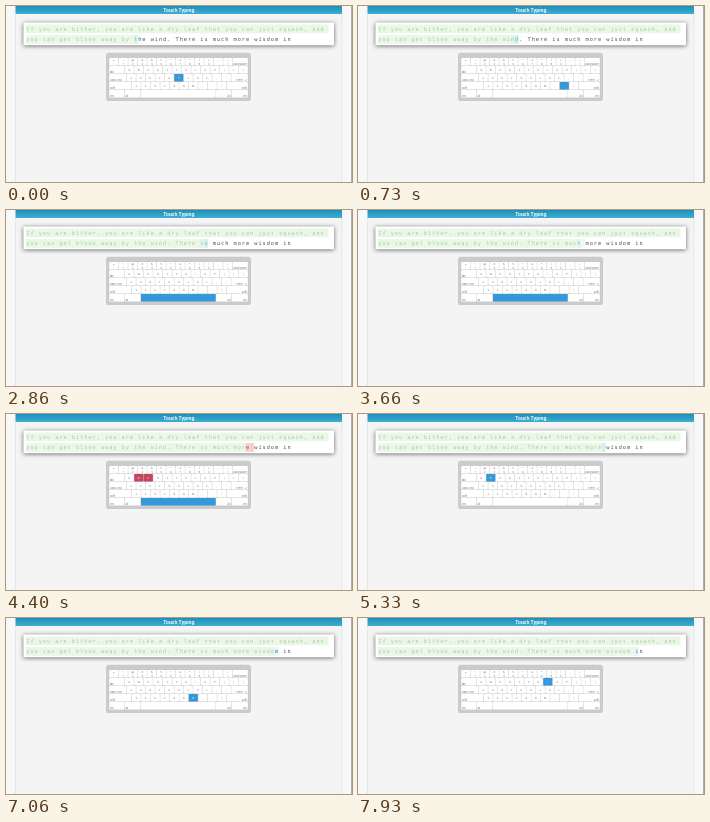
An HTML page with a canvas that plays this animation: 346 px wide and 176 px high, repeating every 8000 ms.

```html
<!DOCTYPE html>
<html lang="en">
<head>
<meta charset="utf-8">
<title>Touch Typing</title>
<style>
html, body { margin: 0; width: 100%; height: 100%; overflow: hidden; background: #f5f5f5; }
canvas { display: block; width: 346px; height: 176px; }
</style>
</head>
<body>
<canvas id="stage"></canvas>
<script>
const W = 346, H = 176, LOOP = 8000, FADE = 180;
const canvas = document.getElementById('stage');
const ctx = canvas.getContext('2d');
const ratio = window.devicePixelRatio || 1;
canvas.width = W * ratio;
canvas.height = H * ratio;

const MONO = '"DejaVu Sans Mono", "Liberation Mono", monospace';
const SANS = 'Inter, "Open Sans", sans-serif';
const LINES = [
  'If you are bitter, you are like a dry leaf that you can just squash, and ',
  'you can get blown away by the wind. There is much more wisdom in'
];
const TEXT_X = 19.8, PITCH = 4.145, LINE_Y = [22.7, 33.2];

// Times at which the cursor reaches each character of the second line.
const FIRST = 27;
const ARRIVALS = [
  -80, 100, 200, 310, 420, 520, 610, 690,
  1540, 1870, 2020, 2140, 2270, 2390, 2490, 2600, 2720, 2820,
  2990, 3130, 3270, 3400, 3530, 3670, 3810, 3950, 4080,
  5060, 5300, 6270, 6420, 6570, 6730, 6900, 7280, 7730
];
// Two wrong keys, held until the cursor steps back.
const MISTAKES = [{ pos: 53, key: 'w', at: 4250 }, { pos: 54, key: 'e', at: 4330 }];
const FIXED = 4900;

const WHITE = [255, 255, 255];
const PAPER = { todo: WHITE, now: [232, 245, 252], hit: [205, 238, 232], done: [234, 247, 231], wrong: [248, 205, 206] };
const INK = { todo: [78, 78, 78], now: [70, 125, 165], hit: [105, 180, 185], done: [166, 205, 162], wrong: [190, 60, 72] };

const clamp = v => Math.max(0, Math.min(1, v));
const mix = (a, b, k) => a.map((v, i) => v + (b[i] - v) * k);
const rgb = c => `rgb(${c.map(Math.round).join(',')})`;
const since = (t, start) => clamp((t - start) / FADE);
const arrival = pos => pos < FIRST ? -LOOP : ARRIVALS[pos - FIRST] ?? LOOP * 2;

// Keyboard layout: [left label, left width, keys, right label]
const KEY = 9.5, ROW_H = 8, LEFT = 103, RIGHT = 242, TOP = 51.8;
const ROWS = [
  ['', 0, '`1234567890-=', 'backspace'],
  ['tab', 15.5, 'qwertyuiop[]\\', ''],
  ['caps lock', 17.5, "asdfghjkl;'", 'enter  ↵'],
  ['shift', 22.5, 'zxcvbnm,./', 'shift']
];
const SHIFTED = '~!@#$%^&*()_+';
const keys = [];
ROWS.forEach(([left, width, chars, right], row) => {
  const y = TOP + row * ROW_H;
  let x = LEFT;
  if (width) keys.push({ x, y, w: width, label: left, align: 'left' });
  x += width;
  [...chars].forEach((id, i) => {
    keys.push({ x, y, w: KEY, id, label: id.toUpperCase(), align: 'center', upper: row ? '' : SHIFTED[i] });
    x += KEY;
  });
  if (right) keys.push({ x, y, w: RIGHT - x, label: right, align: 'right' });
});
const EDGES = [LEFT, 118.5, 134.7, 209.8, 225.5, RIGHT];
['ctrl', 'alt', '', 'alt', 'ctrl'].forEach((label, i) => keys.push({
  x: EDGES[i], y: TOP + 4 * ROW_H, w: EDGES[i + 1] - EDGES[i],
  id: i === 2 ? ' ' : undefined, label, align: i < 2 ? 'left' : 'right'
}));

function box(x, y, w, h, r, fill) {
  ctx.beginPath();
  ctx.roundRect(x, y, w, h, r);
  ctx.fillStyle = fill;
  ctx.fill();
}

function write(text, x, y, font, fill, align = 'center') {
  ctx.font = font;
  ctx.fillStyle = fill;
  ctx.textAlign = align;
  ctx.textBaseline = 'alphabetic';
  ctx.fillText(text, x, y);
}

function drawPage() {
  ctx.fillStyle = '#f8f8f8';
  ctx.fillRect(0, 0, W, H);
  ctx.fillStyle = '#f4f4f4';
  ctx.fillRect(9, 0, 327, H);
  ctx.fillStyle = '#e0e0e0';
  ctx.fillRect(9, 8, 0.7, H);
  ctx.fillRect(335.6, 8, 0.7, H);
  ctx.fillStyle = '#b0b0b0';
  ctx.fillRect(345, 0, 1, H);

  const blue = ctx.createLinearGradient(0, 0, 0, 8);
  blue.addColorStop(0, '#1c8fbb');
  blue.addColorStop(1, '#40add0');
  ctx.fillStyle = blue;
  ctx.fillRect(9.5, 0, 326.5, 8);
  write('Touch Typing', 172.8, 5.7, `700 4.7px ${SANS}`, '#fff');

  ctx.save();
  ctx.shadowColor = 'rgba(0,0,0,.6)';
  ctx.shadowBlur = 4 * ratio;
  ctx.shadowOffsetY = 0.7 * ratio;
  box(17.5, 16.5, 310.5, 22.7, 0.5, '#fff');
  ctx.restore();
}

function cellColor(palette, t, row, pos) {
  if (row === 0) return palette.done;
  const typed = arrival(pos + 1);
  let color = t < typed
    ? mix(palette.todo, palette.now, since(t, arrival(pos)))
    : mix(palette.hit, palette.done, since(t, typed));
  const slip = MISTAKES.find(m => m.pos === pos);
  if (slip && t >= slip.at) {
    color = mix(color, palette.wrong, clamp((t - slip.at) / 60) * (1 - since(t, FIXED)));
  }
  return color;
}

function drawText(t) {
  LINES.forEach((line, row) => {
    const y = LINE_Y[row];
    [...line].forEach((char, pos) => {
      const x = TEXT_X + pos * PITCH;
      const paper = cellColor(PAPER, t, row, pos);
      if (paper.some(v => v < 254)) {
        ctx.fillStyle = rgb(paper);
        ctx.fillRect(x, y - 4.2, PITCH + 0.1, 8.8);
      }
    });
    [...line].forEach((char, pos) => write(
      char, TEXT_X + (pos + 0.5) * PITCH, y + 1.8,
      `5.3px ${MONO}`, rgb(cellColor(INK, t, row, pos))
    ));
  });
}

function expectedKey(t) {
  if (t >= MISTAKES[0].at && t < FIXED) return ' ';
  const reached = ARRIVALS.filter(at => at <= t).length;
  return LINES[1][FIRST + reached - 1].toLowerCase();
}

function drawKeyboard(t) {
  box(100, 46.7, 145, 48.3, 2.8, '#cbcbcb');
  const expected = expectedKey(t);
  const wrong = MISTAKES.filter(m => t >= m.at && t < FIXED).map(m => m.key);
  for (const { x, y, w, id, label, align, upper } of keys) {
    const bad = wrong.includes(id), active = id === expected;
    const fill = bad ? '#c8465c' : active ? '#3498db' : '#fff';
    const ink = bad || active ? '#e8eef4' : '#777';
    box(x + 0.25, y + 0.25, w - 0.4, ROW_H - 0.55, 0.8, fill);
    if (align === 'center') {
      if (upper) write(upper, x + w / 2, y + 3.4, `2.6px ${SANS}`, ink);
      write(label, x + w / 2, y + (upper ? 6.7 : 5), `2.6px ${SANS}`, ink);
    } else {
      const labelX = align === 'left' ? x + 0.9 : x + w - 0.9;
      write(label, labelX, y + 6.9, `2.7px ${SANS}`, ink, align);
    }
  }
}

const start = performance.now();
function render() {
  const t = (performance.now() - start) % LOOP;
  ctx.setTransform(ratio, 0, 0, ratio, 0, 0);
  drawPage();
  drawText(t);
  drawKeyboard(t);
  requestAnimationFrame(render);
}
render();
</script>
</body>
</html>
```
